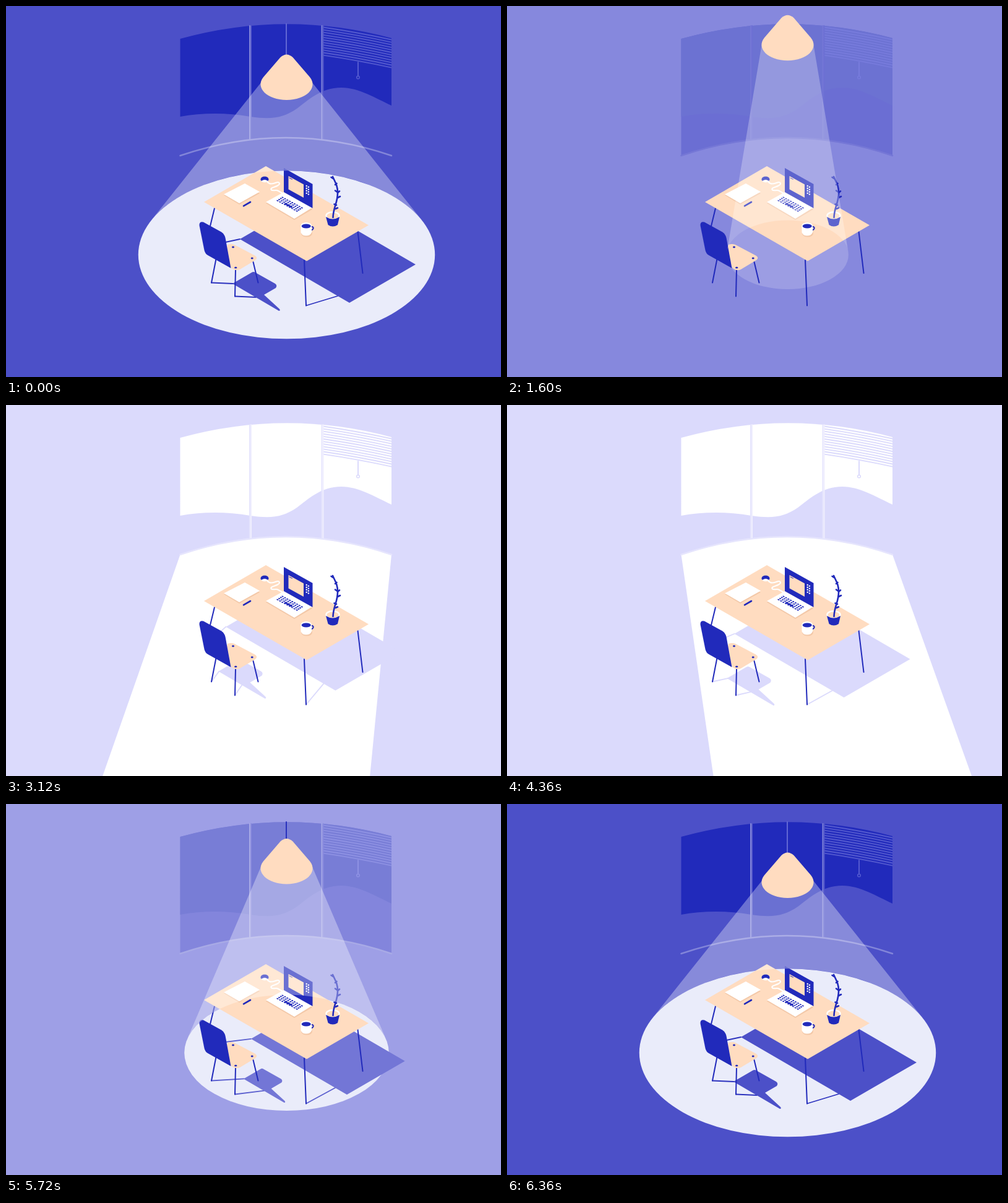
Animation, 800 px wide and 600 px high, one loop 6400 ms. Source, as an HTML page with a canvas:

```html
<!DOCTYPE html>
<html>
<head>
<meta charset="utf-8">
<style>
html, body { margin: 0; width: 100%; height: 100%; overflow: hidden; background: #4c50c8 }
canvas { display: block }
</style>
</head>
<body>
<canvas id="stage" width="800" height="600"></canvas>
<script>
const ctx = document.getElementById('stage').getContext('2d');
const LOOP = 6400;
const INK = [33, 42, 187], NIGHT = [76, 80, 200], DAY = [219, 218, 252], WHITE = [255, 255, 255];
const PEACH = '#ffdcc0', SHADE = '#f3c8a8';

const lerp = (a, b, k) => a + (b - a) * k;
const mix = (a, b, k) => a.map((v, i) => lerp(v, b[i], k));
const rgb = c => `rgb(${c.map(Math.round)})`;
const dark = rgb(INK);

// Eased step from 0 to 1 between times a and b.
function ramp(t, a, b) {
  const k = Math.min(1, Math.max(0, (t - a) / (b - a)));
  return k * k * (3 - 2 * k);
}

function fill(d, color) {
  ctx.fillStyle = color;
  ctx.fill(new Path2D(d));
}
function stroke(d, color, width = 2) {
  ctx.strokeStyle = color;
  ctx.lineWidth = width;
  ctx.stroke(new Path2D(d));
}
function oval(x, y, rx, ry, color, turn = 0) {
  ctx.fillStyle = color;
  ctx.beginPath();
  ctx.ellipse(x, y, rx, ry, turn, 0, 7);
  ctx.fill();
}

const ARC_TOP = 'M281.5 53Q453 6 623 52';
const SILL = 'M281.5 242Q453 184 623 242';
const HILL = 'L623 161C597 149 570 132 542 132C508 132 488 153 470 166C448 181 430 184 395 179C355 172 315 173 281.5 179Z';

function drawWindow(s) {
  fill(ARC_TOP + 'V242Q453 184 281.5 242Z', rgb(s.hill));
  fill(ARC_TOP + HILL, rgb(mix(INK, WHITE, s.sky)));

  const slat = rgb(mix([84, 90, 208], DAY, s.day ** 1.5));
  ctx.save();
  ctx.clip(new Path2D(ARC_TOP + 'V242H281Z'));
  for (let i = 0; i < 12; i++) {
    const y = 34.5 + i * 4.1;
    stroke(`M513 ${y}Q568 ${y + 8} 623 ${y + 20}`, slat, 1.8);
  }
  ctx.restore();
  stroke('M569 91V112.5', slat);
  stroke('M571.3 115.5a2.3 2.3 0 1 1-4.6 0a2.3 2.3 0 1 1 4.6 0', slat, 1.5);

  for (const x of [394, 510.5]) {
    stroke(`M${x} 32V216`, s.trim);
    stroke(`M${x + 2} 32V216`, rgb(mix(s.hill, WHITE, .55 * s.sun + .05 * s.pool)));
  }
}

function drawSun(s) {
  if (!s.sun) return;
  const u = s.hour;
  const depth = 274 + 860 * u;
  const left = 281.5 + depth * (-.905 + 1.24 * u - .19 * u * u);
  const right = 623 + depth * (-.663 + 1.31 * u - .29 * u * u);
  const y = 241 + depth;
  ctx.globalAlpha = s.sun;
  fill(`${SILL}L${right} ${y}Q${(left + right) / 2} ${y + 38} ${left} ${y}Z`, '#fff');
  ctx.globalAlpha = 1;
}

// Shadows follow the sun by day and the lamp by night.
function drawShadows(s) {
  if (!s.shadow) return;
  const grow = s.spot - 1;
  const dx = lerp(-34 + 23.5 * s.hour, 13 * grow, s.pool);
  const dy = lerp(-29 + 22 * s.hour, 32 * grow, s.pool);
  const size = lerp(1, 1 + .4 * grow, s.pool);
  const k = s.day ** 2.3;
  const color = rgb(mix(NIGHT, DAY, k)), line = rgb(mix([44, 50, 190], DAY, k));
  const bx = 555 + dx, by = 480 + dy;
  const lx = bx - 177 * size, ly = by - 103 * size;
  const cx = 443 + dx + 100 * (1 - size), cy = 492 + dy;

  ctx.globalAlpha = s.shadow;
  stroke(`M322 389L${lx} ${ly}M485 484.5L${bx - 19} ${by - 11}`, line, 1.8);
  stroke(`M332 447.5L${cx - 76 * size} ${cy - 43 * size}M370 469.5L${cx - 39 * size} ${cy - 21 * size}`, line, 1.8);
  fill(`M${lx} ${ly}L${bx} ${by}l${107 * size} ${-62 * size}l${-177 * size} ${-103 * size}Z`, color);

  ctx.save();
  ctx.translate(cx, cy);
  ctx.scale(size, size);
  fill('M-77-43L-46-61Q-43-63-40-61L-8-43Q-4-40-7-36L-26-25L-1-2Q1 1-2 1Z', color);
  ctx.restore();
  ctx.globalAlpha = 1;
}

function drawLaptop() {
  fill('M420 319L466 346L495 329L449 302Z', SHADE);
  fill('M449 301L495 326L466 344L420 317Z', '#fff');
  for (let row = 0; row < 4; row++)
    for (let col = 0; col < 9; col++)
      oval(447 + col * 3.9 - row * 2.7, 309.6 + col * 2.1 + row * 1.75, 1.7, .95, dark, .25);
  stroke('M451 319.5L462 325.5', dark);
  fill('M449 262L495.5 288V327L449 301Z', dark);
  fill('M456.5 275L481 288.5V310L456.5 296.5Z', PEACH);
  stroke('M458 278L462.5 280.3', dark, 1);
  for (let i = 0; i < 8; i++)
    oval(485.7 + (i % 2) * 3.2, 291 + (i >> 1) * 3.9 + (i % 2) * 1.8, 1.2, 1.3, '#fff');
}

function drawPlant() {
  oval(528, 339, 11.7, 7, '#fff');
  oval(528, 339.5, 9.5, 5, PEACH);
  fill('M517 341Q528 348 539 341L536 354Q528 359 520.5 354Z', dark);
  stroke('M528.5 342C529 325 536 319 536 302C536 290 532 285 528 276', dark, 2.6);
  stroke('M528.5 279L525.5 277M532 289L534.5 287M535.5 301L532 298.5M536 302L539 299.5M536 310L540 308M534 322L530.5 320.5M532.5 328L536 326.5', dark, 2.6);
}

function drawDesk() {
  stroke('M337 327L322 389M482 411L485 484.5M568.5 365L576.5 432', dark);
  fill('M420 259L586 354.5L486 412.5L320 317Z', PEACH);

  fill('M386 290L410 303L377 321L352 306Z', SHADE);
  fill('M386 287L410 300.5L377 319L352 304.5Z', '#fff');
  stroke('M384 323.3L395 317', dark, 2.6);

  stroke('M422 284C427 290 432 287 437 285.5S444 288 439 290.5S427 294 428.5 297S436 297 439 298.5L449 304', '#fff');
  oval(418, 281.5, 6, 3.8, '#fff');
  fill('M411.5 281C411 274 425 274 424.5 281Q424 284 421.5 282Q418 280 414.5 282Q412 284 411.5 281Z', dark);

  drawLaptop();

  oval(486, 368, 9, 5.5, SHADE);
  stroke('M493 357.5C498 355.5 498 362 492.5 362.5', dark);
  fill('M476.5 356V366Q478 371.5 485 371.5T494 366V356Z', '#fff');
  oval(485.2, 355.5, 8.8, 5.5, '#fff');
  oval(485.2, 356, 7.6, 3.5, dark);

  drawPlant();
}

function drawChair() {
  stroke('M339.5 409L332 447.5M371 427L370 469.5M399.5 414L407.5 447.5', dark);
  fill('M358 386Q364 384 369 386L402 403.5Q408 407 403 411L378 426Q372 429 366 425L352 412Z', PEACH);
  fill('M312.5 355Q312 348 319 349.5L348 365.5Q353 368.5 354.5 375L363.5 424L326 403Q321.5 400 320.5 395Z', dark);
  for (const [x, y] of [[367, 390], [397.7, 408], [371.2, 423.2]]) oval(x, y, 2, 1.4, dark);
}

// Beam from the lamp's rim to the points where it touches the pool of light.
function drawCone(cx, cy, rx, ry, lampY, alpha) {
  const top = 124 + lampY;
  const nx = -41.5 / rx, ny = (top - cy) / ry;
  const a = Math.atan2(ny, nx) - Math.acos(1 / Math.hypot(nx, ny));
  ctx.fillStyle = `rgba(255,255,255,${alpha})`;
  ctx.beginPath();
  ctx.moveTo(cx - 41.5, top);
  ctx.ellipse(cx, cy, rx, ry, 0, a, -Math.PI - a);
  ctx.lineTo(cx + 41.5, top);
  ctx.fill();
}

function drawLamp(y, day) {
  if (y > -49) stroke(`M453 29V${80 + y}`, rgb(mix([105, 110, 215], INK, Math.min(1, day * 2))), 1.8);
  ctx.save();
  ctx.translate(0, y);
  fill('M443.5 83Q453.5 74 463.5 83L491 115C505 132 485 152 453.5 152S402 132 416 115Z', PEACH);
  ctx.restore();
}

function sceneAt(t) {
  const s = {
    hour: (t - 1960) / 2400,
    day: ramp(t, 1320, 1960) - ramp(t, 5440, 6060),
    sky: ramp(t, 1320, 2040) - ramp(t, 5400, 5960),
    sun: ramp(t, 1860, 2120) - ramp(t, 5400, 5600),
    pool: 1 - ramp(t, 1320, 1720) + ramp(t, 5440, 5640),
    shadow: 1 - ramp(t, 1320, 1590) + ramp(t, 1860, 2120),
    spot: 1 + .1 * (ramp(t, 800, 1320) - ramp(t, 5920, 6360)) - 1.1 * (ramp(t, 1320, 1800) - ramp(t, 5440, 5920)),
    lampY: 20 * (ramp(t, 800, 1320) - ramp(t, 5920, 6360)) - 185 * (ramp(t, 1320, 1920) - ramp(t, 5280, 5920))
  };
  s.hill = mix(NIGHT, DAY, s.day ** 1.7);
  s.trim = rgb(mix(s.hill, WHITE, .3 * Math.max(s.pool, s.sun)));
  return s;
}

function draw(t) {
  const s = sceneAt(t);
  const cx = 453.5, cy = 402.3, rx = 239.7 * s.spot, ry = 136 * s.spot;
  const lit = s.spot > .01;

  ctx.fillStyle = rgb(mix(NIGHT, DAY, s.day));
  ctx.fillRect(0, 0, 800, 600);
  drawWindow(s);
  drawSun(s);
  stroke(SILL, s.trim, 2.4);

  if (lit) {
    ctx.globalAlpha = s.pool;
    oval(cx, cy, rx, ry, '#eaecfa');
    ctx.globalAlpha = 1;
  }
  drawShadows(s);
  drawDesk();
  drawChair();
  if (lit) drawCone(cx, cy, rx, ry, s.lampY, .33 * Math.min(1, s.spot * 2));
  drawLamp(s.lampY, s.day);
}

ctx.lineCap = 'round';
const start = performance.now();
function frame() {
  draw((performance.now() - start) % LOOP);
  requestAnimationFrame(frame);
}
frame();
</script>
</body>
</html>
```
